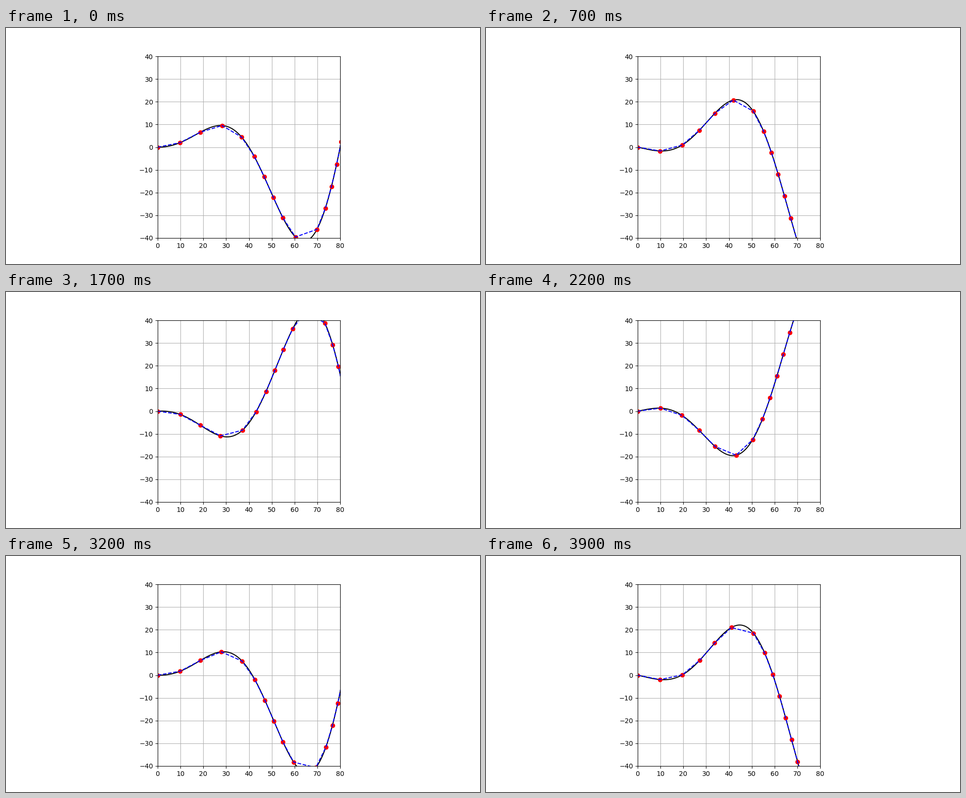
Animation, 1000 px wide and 500 px high, one loop 4 s. Source, as a matplotlib script:

```python
import math

import matplotlib.pyplot as plt
import numpy as np
from matplotlib.animation import FuncAnimation

FRAMES = 40
INTERVAL = 100  # ms
LENGTH = 80
LINK = 10
LINEAR, QUADRATIC = 0.22, 0.0072
WAVE_NUMBER = 2 * math.pi / LENGTH
OMEGA = 2  # rad/s


def wave(x, t):
    """Travelling wave whose amplitude grows along the body."""
    return (LINEAR * x + QUADRATIC * x * x) * np.sin(WAVE_NUMBER * x - OMEGA * t)


def next_joint(x, t):
    """Bisect for the point on the wave one link further on."""
    y = wave(x, t)
    low, high = x, x + LINK
    for _ in range(40):
        mid = (low + high) / 2
        if math.hypot(mid - x, wave(mid, t) - y) < LINK:
            low = mid
        else:
            high = mid
    return high


def joints(t):
    xs = [0.0]
    while xs[-1] <= LENGTH:
        xs.append(next_joint(xs[-1], t))
    xs = np.array(xs)
    return xs, wave(xs, t)


fig, ax = plt.subplots(figsize=(10, 5), dpi=100)
ax.set_aspect("equal")
ax.set_xlim(0, LENGTH)
ax.set_ylim(-40, 40)
ax.set_xticks(range(0, 81, 10))
ax.set_yticks(range(-40, 41, 10))
ax.grid()

body_x = np.linspace(0, LENGTH + 2, 500)
body, = ax.plot([], [], "k-")
dots, = ax.plot([], [], "ro")
links, = ax.plot([], [], "b--")


def update(frame):
    t = frame * INTERVAL / 1000
    body.set_data(body_x, wave(body_x, t))
    xs, ys = joints(t)
    dots.set_data(xs, ys)
    links.set_data(xs, ys)
    return body, dots, links


anim = FuncAnimation(fig, update, frames=FRAMES, interval=INTERVAL,
                     repeat=True, repeat_delay=0)
plt.show()
```
